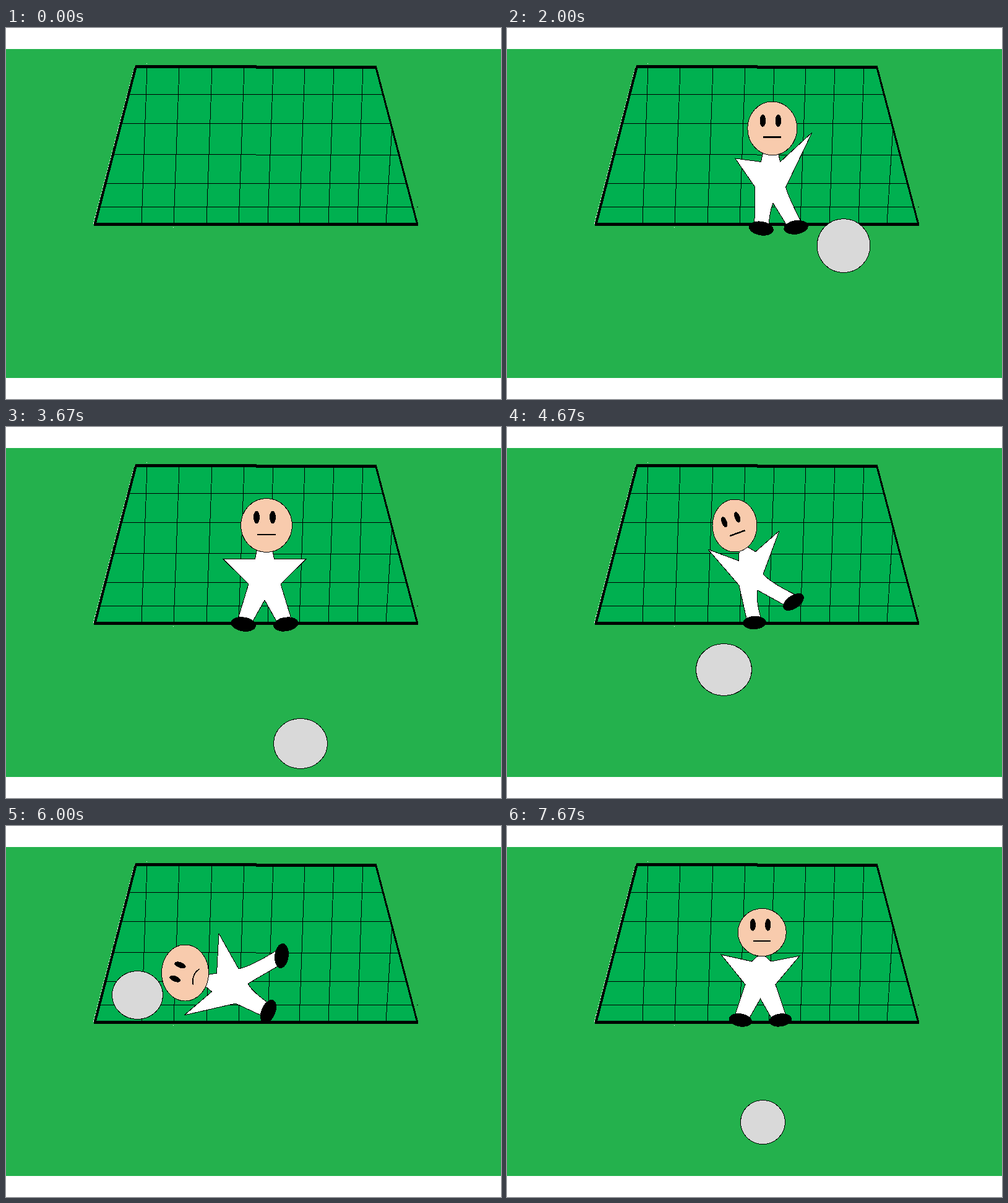
An HTML page for the animation above (8000 ms loop, 800 px wide and 600 px high).

```html
<!DOCTYPE html>
<html lang="en">
<head>
<meta charset="utf-8">
<title>Goalkeeper</title>
<style>
html, body { margin: 0; width: 100%; height: 100%; overflow: hidden; background: #fff }
svg { display: block }
</style>
</head>
<body>
<svg width="800" height="600" shape-rendering="crispEdges" stroke="#000">
  <rect y="34" width="800" height="532" fill="#24b14d" stroke="none"/>
  <path d="M210 62H598L665 318H143Z" fill="#00b050" stroke="none"/>
  <path d="M207.5 63L141 317" stroke="#fff" stroke-dasharray="2 3"/>
  <path d="M227 57.5h1M270 322.5h1" stroke="#fff"/>
  <path id="net" fill="none"/>
  <path d="M209 62.5H405M404 63.5H599M142 317.5H666" stroke-width="5"/>
  <path d="M210 62L143.5 318" stroke-width="4"/>
  <path d="M598 64L665 318" stroke-width="3"/>
  <g id="scene"></g>
</svg>
<script>
const get = id => document.getElementById(id);

// Keeper poses: a few joints, from which the outline is built.
// head: centre and radii; feet: centre and angle; [left, right] pairs.
const base = { tilt: 0, lean: 0, collar: 12.5, bend: 0, frown: 0, smile: 0, shift: [0, 0] };

function standing(cx, top, sx, sy) {
  const point = (dx, dy) => [cx + dx * sx, top + dy * sy];
  const pair = (dx, dy) => [point(-dx, dy), point(dx, dy)];
  const [left, right] = pair(34.3, 204);
  return {
    ...base,
    head: [...point(3, 44), 41.5 * sx, 43.5 * sy],
    neck: point(0, 98),
    hands: pair(67.5, 98),
    waist: pair(26, 139),
    crotch: point(0, 165),
    feet: [[...left, 9], [...right, -8]]
  };
}

const first = standing(400, 122, .88, .965);
const saved = { ...standing(454, 111, 1, 1.05), smile: 1 };
const raised = { ...saved, smile: 0, hands: [saved.hands[0], [515, 126]] };
const second = standing(418, 115, 1, 1);
const third = standing(409.5, 133, .94, .887);
const ready = { ...third, neck: [411, 219], collar: 0, hands: [[346, 208], [473, 210]] };
const step1 = {
  ...base, bend: 5,
  head: [400.5, 167.5, 38.5, 41], neck: [398, 219],
  hands: [[351, 208], [471, 212]], waist: [[374, 258], [421, 258]],
  crotch: [406, 282], feet: [[402, 323, 10], [446, 319.5, -8]]
};
const kick = {
  ...base, bend: 5, tilt: -20, lean: -28, collar: 7,
  head: [368, 159.5, 36, 42.5], neck: [388, 209],
  hands: [[325, 198], [440, 168]], waist: [[375, 256], [414, 238]],
  crotch: [405, 264], feet: [[400, 316.5, -3], [463, 283, -35]]
};
const fallen = {
  ...base, bend: 5, tilt: -70, lean: -75, collar: 9, frown: 1,
  head: [289.5, 237.5, 38, 45.5], neck: [336.5, 253],
  hands: [[288, 306], [344, 174]], waist: [[371, 287], [376, 231]],
  crotch: [391, 255], feet: [[424, 300, -67], [445.5, 210, -83]]
};

// Keys: step, value, easing towards the next key
const linear = t => t, easeIn = t => t ** 1.35, easeOut = t => 1 - (1 - t) ** 2;
const shots = [
  {
    keeper: [[1, first], [4, step1], [8, raised], [9, saved]],
    ball: [[2, [546, 516.5, 39.5, 37]], [4, [552, 409, 41.5, 39.5], easeOut],
      [7, [543, 345, 43, 44]], [9, [608.5, 439.5, 44, 46]]]
  },
  {
    keeper: [[11, second, easeIn], [14, kick, easeIn], [18, fallen], [19, { ...fallen, shift: [10, 21] }]],
    ball: [[11, [476, 512, 43.5, 40.5], easeIn], [14, [350.5, 392.5, 45, 42], easeOut],
      [18, [212.5, 273.5, 41, 39]], [19, [204, 262, 40.5, 38.5]]]
  },
  {
    keeper: [[21, third], [22, third], [23, ready]],
    ball: [[22, [413.5, 514.5, 39, 35.5]], [23, [413.5, 479, 36, 35.5]]]
  }
];

function mix(a, b, t) {
  if (typeof a === 'number') return a + (b - a) * t;
  if (Array.isArray(a)) return a.map((v, i) => mix(v, b[i], t));
  return Object.fromEntries(Object.keys(a).map(k => [k, mix(a[k], b[k], t)]));
}

function track(keys, step) {
  const i = keys.findLastIndex(key => key[0] <= step);
  if (i < 0) return null;
  const [from, value, ease = linear] = keys[i], next = keys[i + 1];
  if (!next) return step === from ? value : null;
  return mix(value, next[1], ease((step - from) / (next[0] - from)));
}

const oval = ([x, y, rx, ry], color, turn = 0) =>
  `<ellipse cx="${x}" cy="${y}" rx="${rx}" ry="${ry}" fill="${color}" transform="rotate(${turn} ${x} ${y})"/>`;

// The point at (dx, dy) from the origin, in axes turned by an angle
function offset([x, y], dx, dy, angle) {
  const c = Math.cos(angle), s = Math.sin(angle);
  return [x + dx * c - dy * s, y + dx * s + dy * c];
}

// Inner and outer ankle; side is -1 for left, 1 for right
function ankles(hip, crotch, foot, side) {
  const top = mix(hip, crotch, .5);
  const angle = Math.atan2(foot[1] - top[1], foot[0] - top[0]);
  return [side, -side].map(s => offset(foot, -5, 11.5 * s, angle));
}

// A curve from p to q that sags sideways near the knee
function curve(p, q, knee, bend) {
  const angle = Math.atan2(q[1] - p[1], q[0] - p[0]);
  return `Q${offset(mix(p, q, knee), 0, -bend, angle)} ${q}`;
}

function face({ head: [x, y, rx], tilt, smile, frown }) {
  const mouth = smile === 1
    ? '<path d="M-18 11Q-1 16 12 8Q12 28 -3 28.5Q-14 27 -18 11Z" fill="#fff"/>'
    : `<path d="M-15.5 ${15 + 6 * frown}Q0 ${15 - 4 * frown} 15 ${15 + 6 * frown}" fill="none" stroke-width="${2.8 - frown}"/>`;
  return `<g transform="translate(${x} ${y}) rotate(${tilt}) scale(${rx / 41.5})">
    ${oval([-16, -13, 4.5, 10], '#000')}${oval([10, -13, 4.5, 10], '#000')}${mouth}</g>`;
}

function keeper(pose) {
  const { head, neck, lean, collar, hands, waist, crotch, feet, bend, shift } = pose;
  const angle = lean * Math.PI / 180;
  const [neckL, shoulderL, shoulderR, neckR] =
    [[-collar, -14], [-15.5, 0], [15.5, 0], [collar, -14]].map(([dx, dy]) => offset(neck, dx, dy, angle));
  const [outerL, innerL] = ankles(waist[0], crotch, feet[0], 1);
  const [outerR, innerR] = ankles(waist[1], crotch, feet[1], -1);
  const body = `M${neckL}L${shoulderL}L${hands[0]}L${waist[0]}L${outerL}L${innerL}`
    + curve(innerL, crotch, .7, bend) + `L${innerR}L${outerR}`
    + curve(outerR, waist[1], .7, bend) + `L${hands[1]}L${shoulderR}L${neckR}Z`;
  const size = (head[2] + head[3]) * .235;
  const shoes = feet.map(([x, y, turn]) => oval([x, y, size, size * .55], '#000', turn)).join('');
  return `<g transform="translate(${shift})"><path d="${body}" fill="#fff"/>
    ${shoes}${oval(head, '#f8cbad')}${face(pose)}</g>`;
}

function net() {
  let d = 'M172 204.5H404M404 205.5H635M624 160L614 317M664 289.5h2';
  for (const y of [107.5, 154.5, 251.5, 289.5]) {
    const slope = (y - 62) * .262;
    d += `M${209 - slope} ${y}H${598 + slope}`;
  }
  for (const x of [228, 280, 333, 385, 432, 483, 530, 577]) d += `M${x} 64l-9 253`;
  return d;
}

function draw(step) {
  get('scene').innerHTML = shots.map(shot => {
    const pose = track(shot.keeper, step), ball = track(shot.ball, step);
    return (pose ? keeper(pose) : '') + (ball ? oval(ball, '#d9d9d9') : '');
  }).join('');
}

let start, shown;
function tick(now) {
  start ??= now;
  const t = (now - start) % 8000, rest = t % 1000;
  // Three steps a second
  const step = Math.floor(t / 1000) * 3 + (rest >= 330) + (rest >= 670);
  if (step !== shown) draw(shown = step);
  requestAnimationFrame(tick);
}
get('net').setAttribute('d', net());
requestAnimationFrame(tick);
</script>
</body>
</html>
```
